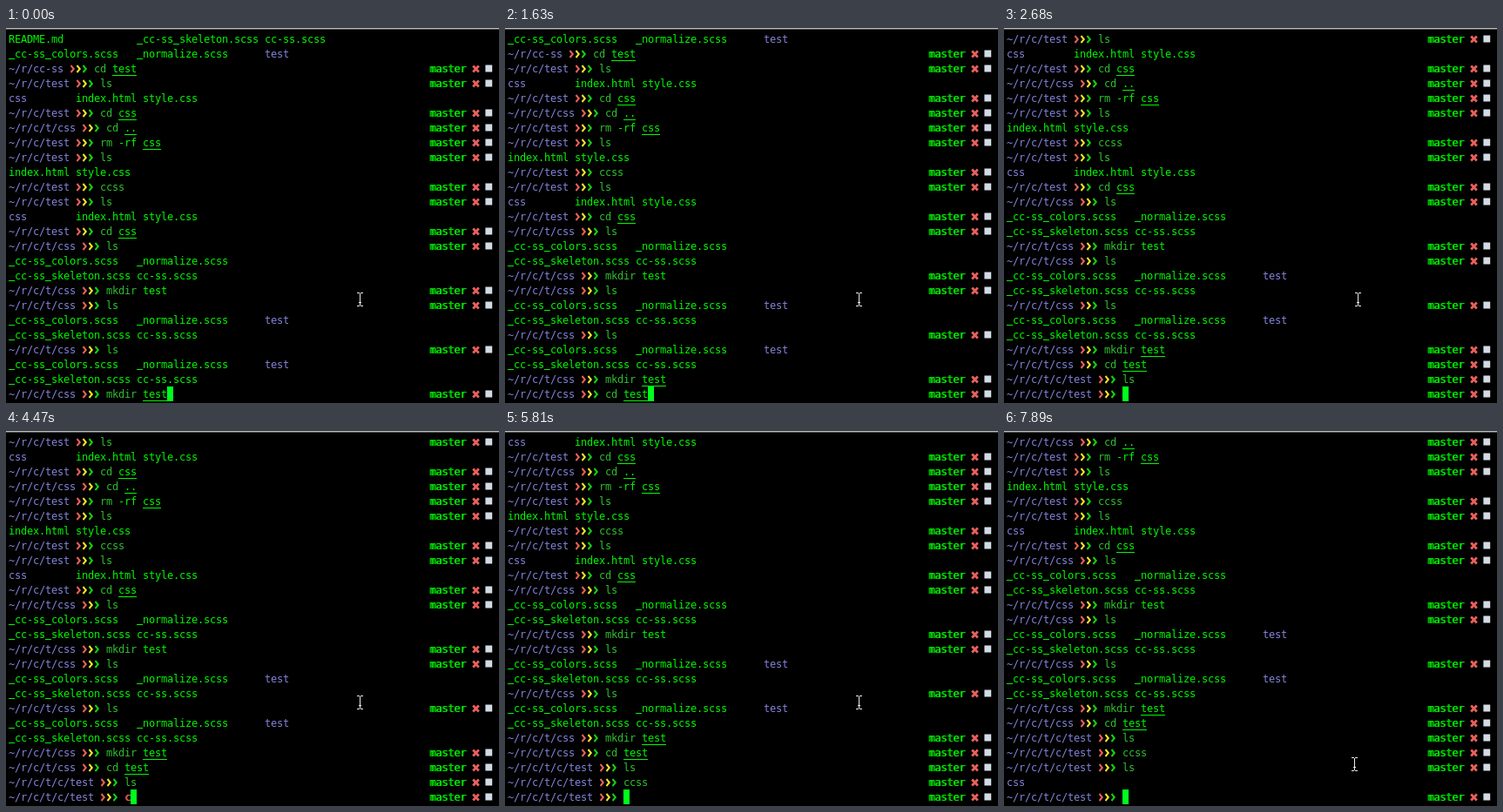
Recreate the animation shown at these times as an HTML page with a canvas. Size 566 by 431 pixels, loop 8000 ms.

```html
<!DOCTYPE html>
<html lang="en">
<head>
<meta charset="utf-8">
<title>Terminal session</title>
<style>
  html, body { margin: 0; width: 100%; height: 100%; overflow: hidden; background: #000; }
  canvas { display: block; }
</style>
</head>
<body>
<canvas id="screen" width="566" height="431"></canvas>
<script>
const ctx = document.getElementById('screen').getContext('2d');
const LOOP = 8000, CELL = 7, LINE = 17, LEFT = 3, TOP = 4, ROWS = 25;
const FONT = '12px "DejaVu Sans Mono", monospace';
const GREEN = '#00f800', COMMAND = '#2fc22f', BLUE = '#8484dc', RED = '#e8605c';
const YELLOW = '#f0e428', BRANCH = '#00e000', SQUARE = '#d2dbe4', CURSOR = '#00ff1c';
const KNOWN = ['cd', 'ls', 'mkdir', 'rm', 'cc', 'ccss'];

// Text after "|" in a command is underlined as an existing path.
const prompt = (path, command) => ({ path, command });
const files = (...items) => ({ items });
const test = command => prompt('~/r/c/test', command);
const css = command => prompt('~/r/c/t/css', command);
const nested = command => prompt('~/r/c/t/c/test', command);

// Each listing item is [column, name, isFolder].
const colors = [0, '_cc-ss_colors.scss'];
const normalize = [21, '_normalize.scss'];
const folder = [42, 'test', true];
const skeleton = files([0, '_cc-ss_skeleton.scss'], [21, 'cc-ss.scss']);
const site = files([0, 'css', true], [11, 'index.html'], [22, 'style.css']);
const withFolder = files(colors, normalize, folder);

const log = [
  files([0, 'README.md'], [21, '_cc-ss_skeleton.scss'], [42, 'cc-ss.scss']),
  withFolder,
  prompt('~/r/cc-ss', 'cd |test'),
  test('ls'), site,
  test('cd |css'),
  css('cd |..'),
  test('rm -rf |css'),
  test('ls'), files([0, 'index.html'], [11, 'style.css']),
  test('ccss'),
  test('ls'), site,
  test('cd |css'),
  css('ls'), files(colors, normalize), skeleton,
  css('mkdir test'),
  css('ls'), withFolder, skeleton,
  css('ls'), withFolder, skeleton,
  css('mkdir |test'),
  css('cd |test'),
  nested('ls'),
  nested('ccss'),
  nested('ls'), files([0, 'css', true]),
  nested('')
];

// [time, lines printed, characters typed on the last line]
const typing = [
  [0, 25, 10],
  [750, 26, 0], [890, 26, 1], [1040, 26, 3], [1190, 26, 4],
  [1340, 26, 5], [1480, 26, 6], [1630, 26, 7],
  [1930, 27, 0], [2380, 27, 2],
  [2680, 28, 0], [4470, 28, 1], [4770, 28, 2], [4920, 28, 3], [5210, 28, 4],
  [5810, 29, 0], [6560, 29, 2],
  [7000, 31, 0]
];

// [time, x, y]
const pointer = [
  [0, 406, 312], [7450, 400, 314], [7600, 347, 335], [7750, 379, 362], [7890, 402, 383]
];

const current = (steps, time) => steps.findLast(step => step[0] <= time);
const columnX = column => LEFT + column * CELL;

function rect(color, x, y, w, h) {
  ctx.fillStyle = color;
  ctx.fillRect(x, y, w, h);
}

function write(text, column, top, color) {
  ctx.font = FONT;
  ctx.fillStyle = color;
  [...text].forEach((char, i) => {
    const x = columnX(column + i);
    if (char === '_') ctx.fillRect(x, top + 14, CELL, 1);
    else ctx.fillText(char, x, top + 13);
  });
}

// The terminal font has no bold cut, so heavy text is struck twice.
function writeBold(text, column, top, color) {
  write(text, column, top, color);
  write(text, column + 1 / CELL, top, color);
}

function stroke(color, width, ...lines) {
  ctx.strokeStyle = color;
  ctx.lineWidth = width;
  ctx.beginPath();
  for (const [start, ...rest] of lines) {
    ctx.moveTo(...start);
    rest.forEach(point => ctx.lineTo(...point));
  }
  ctx.stroke();
}

function drawStatus(top) {
  writeBold('master', 69, top, BRANCH);
  const x = columnX(76), y = top + 9;
  stroke(RED, 2.8,
    [[x + 1.2, y - 3.5], [x + 7.8, y + 3.5]],
    [[x + 7.8, y - 3.5], [x + 1.2, y + 3.5]]);
  rect(SQUARE, 550.4, top + 4.5, 7.8, 8);
}

function drawPrompt({ path, command }, top, typed = Infinity, active = false) {
  write(path, 0, top, BLUE);
  [RED, YELLOW, '#14d014'].forEach((color, i) => {
    const x = columnX(path.length + 1 + i);
    stroke(color, 2, [[x + 1.5, top + 5], [x + 4.8, top + 9], [x + 1.5, top + 13]]);
  });

  const start = path.length + 5;
  const mark = command.indexOf('|');
  const text = command.replace('|', '').slice(0, typed);
  const name = text.split(' ')[0];
  if (KNOWN.includes(name)) write(name, start, top, COMMAND);
  else writeBold(name, start, top, RED);
  write(text.slice(name.length), start + name.length, top, GREEN);
  if (mark >= 0 && text.length > mark) {
    rect(GREEN, columnX(start + mark), top + 16, (text.length - mark) * CELL, 1);
  }
  if (active) rect(CURSOR, columnX(start + text.length), top, CELL, LINE);
  drawStatus(top);
}

function drawPointer(x, y) {
  const white = '#ececec';
  rect(white, x, y - 7, 1, 14);
  for (const edge of [y - 8, y + 7]) {
    rect(white, x - 3, edge, 3, 1);
    rect(white, x + 1, edge, 3, 1);
  }
  rect(white, x - 1, y + 3, 3, 1);
}

function draw(time) {
  rect('#000', 0, 0, 566, 431);
  rect('#bdbdbd', 0, 0, 566, 1);
  rect('#4a4a4a', 0, 1, 566, 1);

  const [, count, typed] = current(typing, time);
  log.slice(count - ROWS, count).forEach((line, row) => {
    const top = TOP + row * LINE;
    if (line.items) {
      line.items.forEach(([column, name, isFolder]) =>
        write(name, column, top, isFolder ? BLUE : GREEN));
    } else if (row === ROWS - 1) {
      drawPrompt(line, top, typed, true);
    } else {
      drawPrompt(line, top);
    }
  });

  const [, x, y] = current(pointer, time);
  drawPointer(x, y);
}

const began = performance.now();
function tick() {
  draw((performance.now() - began) % LOOP);
  requestAnimationFrame(tick);
}
tick();
</script>
</body>
</html>
```
